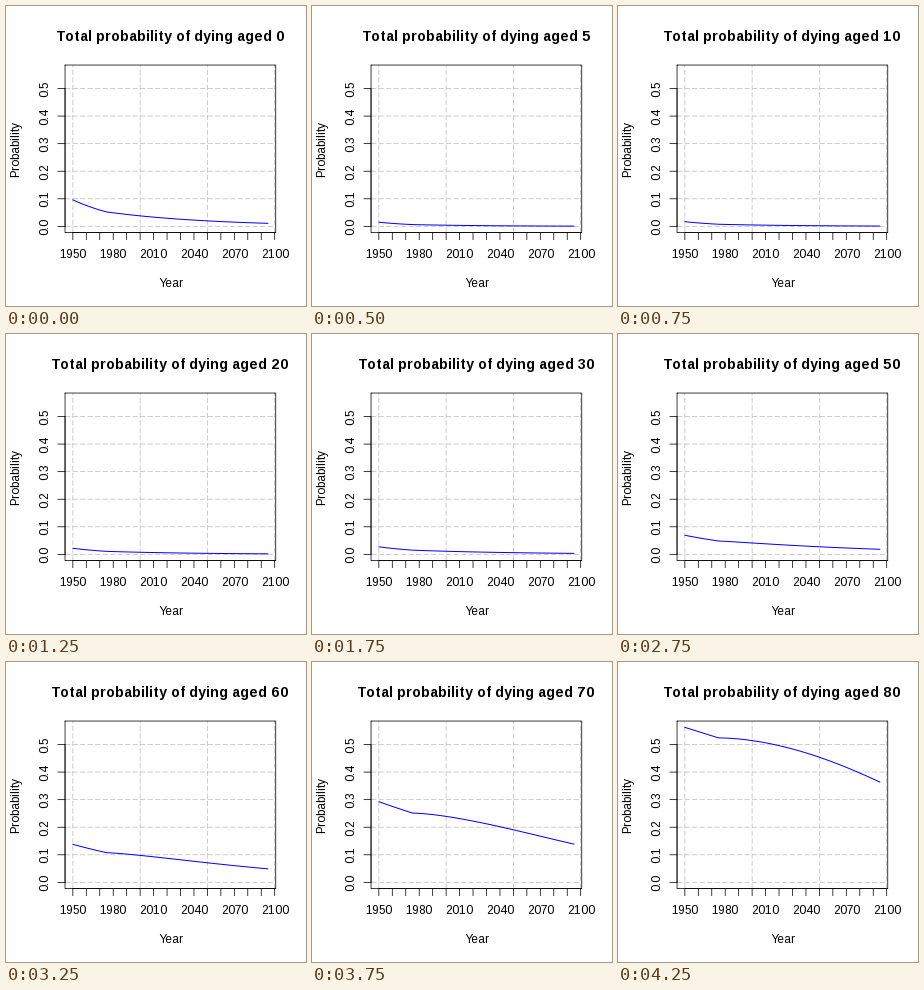
These frames come from a looping animation (300x300 px, 4.5 s). A matplotlib script:

```python
import numpy as np
import matplotlib.pyplot as plt
from matplotlib.animation import FuncAnimation

SIZE, DPI = 300, 72
plt.rcParams["font.family"] = "Liberation Sans"
plt.rcParams["text.hinting_factor"] = 1  # whole-pixel letter spacing

LEFT, RIGHT, TOP, BOTTOM = 59.04, 269.76, 59.04, 226.56
MAX_PROB = 0.5626
AGES = [0, 1] + list(range(5, 85, 5))
YEARS = np.arange(1950, 2096, 5)


def logit_ends(age):
    """Log-odds of dying in the first and in the last year."""
    if age < 20:
        first = np.interp(age, [0, 5, 20], [-2.24, -4.18, -3.79])
        last = np.interp(age, [0, 5, 20], [-4.50, -7.13, -6.26])
    else:
        s = (age - 20) / 60
        first = -3.79 + 0.73 * s + 3.31 * s**2
        last = -6.26 + 3.42 * s + 2.28 * s**2
    return first, last


def probability(age):
    """Fast decline until 1975, then slower; later for the old."""
    first, last = logit_ends(age)
    old = max(0, age / 40 - 1) ** 1.3
    early = 0.29 - 0.1 * old
    ramp = np.clip((YEARS - 1950) / 25, 0, 1)
    tail = np.clip((YEARS - 1975) / 120, 0, 1) ** (1 + 0.8 * old)
    progress = early * ramp + (1 - early) * tail
    return 1 / (1 + np.exp(-(first + (last - first) * progress)))


def to_x(year):
    return LEFT + (RIGHT - LEFT) * (0.04 + (year - 1950) / 145) / 1.08


def to_y(prob):
    return BOTTOM - (BOTTOM - TOP) * (0.04 + prob / MAX_PROB) / 1.08


fig = plt.figure(figsize=(SIZE / DPI, SIZE / DPI), dpi=DPI, facecolor="white")
ax = fig.add_axes([0, 0, 1, 1])
ax.set(xlim=(0, SIZE), ylim=(SIZE, 0))
ax.axis("off")


def stroke(xs, ys, color="black", lw=0.75, **style):
    style = {"zorder": 3, "solid_capstyle": "round", **style}
    return ax.plot(xs, ys, color=color, lw=lw, snap=False, **style)[0]


def label(x, y, text, size=12, **style):
    return ax.text(x, y, text, fontsize=size, ha="center", va="baseline",
                   rotation_mode="anchor", **style)


mid_x, mid_y = (LEFT + RIGHT) / 2, (TOP + BOTTOM) / 2
grid = dict(color="#bebebe", linestyle=(0, (7, 3)), zorder=1)

for year in range(1950, 2101, 50):
    stroke([to_x(year)] * 2, [BOTTOM, TOP], **grid)
for prob in np.arange(6) / 10:
    y = to_y(prob)
    stroke([LEFT, RIGHT], [y, y], **grid)
    stroke([LEFT, LEFT - 7.2], [y, y])
    label(42, y, f"{prob:.1f}", rotation=90)
for year in range(1950, 2101, 10):
    x = to_x(year)
    stroke([x, x], [BOTTOM, BOTTOM + 7.2])
    if (year - 1950) % 30 == 0:
        label(x, 252, str(year))

stroke([LEFT, RIGHT, RIGHT, LEFT, LEFT], [TOP, TOP, BOTTOM, BOTTOM, TOP])
stroke([to_x(1950), to_x(2100)], [BOTTOM, BOTTOM])
stroke([LEFT, LEFT], [to_y(0), to_y(0.5)])
label(mid_x, 281, "Year")
label(13, mid_y, "Probability", rotation=90)
title = label(mid_x, 35, "", size=14.4, weight="bold")
curve = stroke([], [], color="blue", lw=1, zorder=2)


def update(frame):
    age = AGES[frame]
    title.set_text(f"Total probability of dying aged {age}")
    curve.set_data(to_x(YEARS), to_y(probability(age)))
    return title, curve


anim = FuncAnimation(fig, update, frames=len(AGES), interval=250,
                     repeat=True, repeat_delay=0)
plt.show()
```
